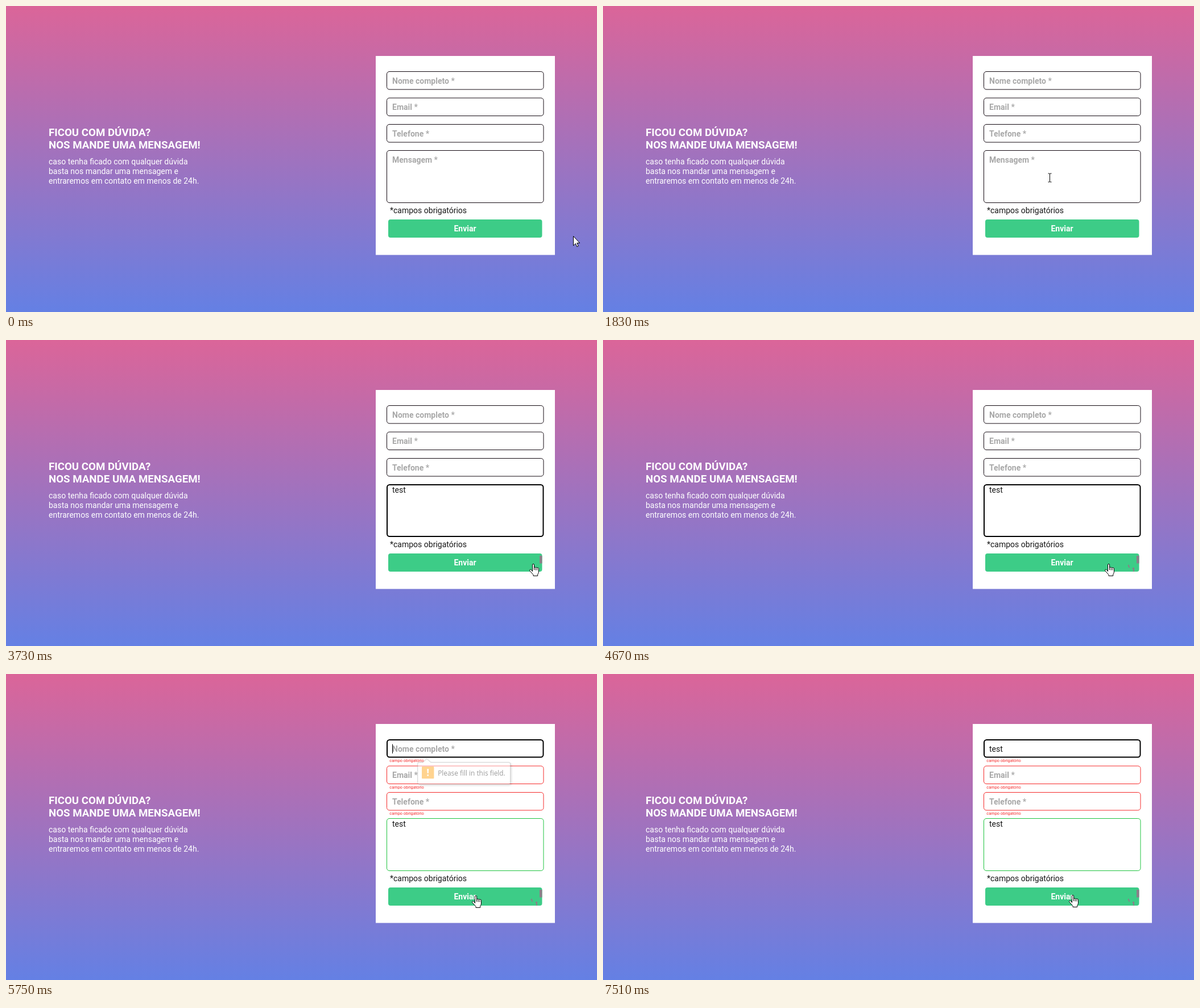
These frames come from a looping animation (1039 px wide and 539 px high, 8 s). An HTML page:

```html
<!DOCTYPE html>
<html lang="pt">
<head>
<meta charset="utf-8">
<title>Formulário de contato</title>
<style>
  html, body { margin: 0; width: 100%; height: 100%; overflow: hidden; }
  svg { display: block; width: 1039px; height: 539px; font: 14px Roboto, sans-serif; }
  text { white-space: pre; }
  .bold { font-weight: 700; }
  .hint { font-weight: 700; fill: #a8a8a8; }
  .typed, .note { fill: #181818; }
  .field { fill: #fff; stroke: #140a12; }
  .error { font-size: 7.4px; fill: #f52a2a; }
  .cursor { fill: #fff; stroke: #000; stroke-linejoin: round; }
</style>
</head>
<body>
<svg viewBox="0 0 1039 539">
  <defs>
    <linearGradient id="sky" x2="0" y2="1">
      <stop stop-color="#db6599"/>
      <stop offset="1" stop-color="#6480e4"/>
    </linearGradient>
    <filter id="shadow" x="-10%" y="-20%" width="120%" height="150%">
      <feDropShadow dx="2" dy="2" stdDeviation="1.5" flood-opacity=".3"/>
    </filter>
  </defs>
  <rect width="1039" height="539" fill="url(#sky)"/>
  <g fill="#fff">
    <g class="bold" font-size="18.7">
      <text x="75" y="229">FICOU COM DÚVIDA?</text>
      <text x="75" y="251.3">NOS MANDE UMA MENSAGEM!</text>
    </g>
    <text x="75" y="279">caso tenha ficado com qualquer dúvida</text>
    <text x="75" y="296">basta nos mandar uma mensagem e</text>
    <text x="75" y="312.5">entraremos em contato em menos de 24h.</text>
    <rect x="650" y="88" width="315" height="350.5"/>
  </g>
  <g id="form"></g>
  <text class="note" x="675" y="364.5">*campos obrigatórios</text>
  <rect x="672" y="376" width="270.5" height="32" rx="4" fill="#3dcc87"/>
  <text class="bold" x="807" y="397" text-anchor="middle" fill="#fff">Enviar</text>
  <g fill="#8a7f88">
    <path id="smudge1" d="M938 380h4.5v13.5h-4.5z"/>
    <path id="smudge2" d="M923 396h2v3h1v2h-2v-2h-1zM931 401h3v7h-2v-4h-1z"/>
  </g>
  <rect id="caret" width="1" height="16.5" fill="#000"/>
  <g id="bubble">
    <path d="M726.5 155.5H733l7-6.5 7 6.5H888.500q2.500 0 2.500 2.500V192.500q0 2.500-2.500 2.500H726q-2.500 0-2.500-2.500V158q0-2.500 2.500-2.500z"
      fill="#fff" stroke="#929292" filter="url(#shadow)"/>
    <rect x="731" y="163" width="22" height="22" rx="1" fill="#ff9f06"/>
    <path d="M740.500 167.500h3l-.5 8h-2zM740.700 177.500h2.600v2.600h-2.600z" fill="#fff"/>
    <text x="760" y="180" font-size="12.2" font-family="Open Sans, sans-serif" fill="#222">Please fill in this field.</text>
  </g>
  <path id="arrow" class="cursor" d="M.5 .5V17l3.800-3.600 2.500 5.600 2.500-1.100-2.500-5.400h4.900z"/>
  <path id="beam" d="M-3 -7.500h2.500l.5 .5 .5-.5H3M0 -7V7M-3 7.500h2.500l.5-.5 .5 .5H3" fill="none" stroke="#000"/>
  <path id="hand" class="cursor" d="M-1.500 13.500V2a1.500 1.500 0 0 1 3 0V7a1.400 1.400 0 0 1 2.700 .5 1.400 1.400 0 0 1 2.700 .5 1.300 1.300 0 0 1 2.600 1.200V14q0 3-1.800 4.800V21.500H0V19.500L-6 12.700q-1-1.600 .3-2.300t2.400 .8zM1.500 7v4M4.200 8v3.500M6.900 8.500v3"/>
</svg>
<script>
const LOOP = 8000, BLINK = 530, FOCUS_MESSAGE = 2100, SUBMIT = 5540;
const MESSAGE_KEYS = [2510, 2640, 2840, 2970];
const NAME_KEYS = [6590, 6720, 6850, 6980];

// Pointer stops: time, x, y
const POINTER = [
  [850, 997, 405], [1690, 789, 308], [1830, 785.5, 302.5],
  [2130, 785.5, 302.5], [2450, 945, 387], [3100, 945, 387],
  [3730, 927, 394], [3800, 924, 395.5], [4330, 924, 395.5],
  [5140, 833, 391], [5210, 826, 390], [6660, 826, 390], [6730, 826, 389]
];

const $ = id => document.getElementById(id);
const clamp = v => Math.max(0, Math.min(1, v));
const show = (el, on) => el.setAttribute('visibility', on ? 'visible' : 'hidden');

function add(tag, attrs, content = '') {
  const el = document.createElementNS('http://www.w3.org/2000/svg', tag);
  for (const key in attrs) el.setAttribute(key, attrs[key]);
  el.textContent = content;
  return $('form').appendChild(el);
}

function makeField(label, y, height, typedY) {
  const field = {
    y, height, typedY,
    box: add('rect', { class: 'field' }),
    hint: add('text', { class: 'hint', x: 679, y: y + 21.7 }, label),
    typed: add('text', { class: 'typed', x: 679, y: typedY }),
    error: add('text', { class: 'error', x: 674.3, y: y + 40 }, 'campo obrigatório')
  };
  setBorder(field, '#140a12', 1);
  return field;
}

function setBorder({ box, y, height }, color, width) {
  const attrs = {
    x: 669 + width / 2, y: y + width / 2, rx: 4.5,
    width: 276.5 - width, height: height - width, 'stroke-width': width
  };
  for (const key in attrs) box.setAttribute(key, attrs[key]);
  box.style.stroke = color;
}

const nameField = makeField('Nome completo *', 115, 32.5, 136.5);
const email = makeField('Email *', 161.5, 32.5, 183);
const phone = makeField('Telefone *', 208, 32.5, 229);
const message = makeField('Mensagem *', 254, 93, 268.5);

function setTyped(field, keys, t) {
  field.typed.textContent = 'test'.slice(0, keys.filter(k => k <= t).length);
  show(field.hint, !field.typed.textContent);
}

function pointerAt(t) {
  const next = POINTER.findIndex(p => p[0] > t);
  if (next < 1) return POINTER.at(next).slice(1);
  const [t0, x0, y0] = POINTER[next - 1], [t1, x1, y1] = POINTER[next];
  const u = (t - t0) / (t1 - t0), e = u * u * (3 - 2 * u);
  return [x0 + (x1 - x0) * e, y0 + (y1 - y0) * e];
}

function drawPointer(t) {
  const [x, y] = pointerAt(t);
  const inside = (l, top, r, b) => x > l && x < r && y > top && y < b;
  const kind = inside(672, 376, 942.5, 408) ? 'hand'
    : inside(669, 254, 945, 347) ? 'beam' : 'arrow';
  for (const id of ['arrow', 'beam', 'hand']) show($(id), id === kind);
  const snap = kind === 'beam' ? v => Math.floor(v) + 0.5 : Math.round;
  $(kind).setAttribute('transform', `translate(${snap(x)} ${snap(y)})`);
}

function drawCaret(t, submitted) {
  const field = submitted ? nameField : message;
  const events = submitted ? [SUBMIT, ...NAME_KEYS] : [FOCUS_MESSAGE, ...MESSAGE_KEYS];
  const last = Math.max(...events.filter(e => e <= t));
  show($('caret'), t >= FOCUS_MESSAGE && (t - last) % (2 * BLINK) < BLINK);
  const width = field.typed.textContent ? field.typed.getComputedTextLength() : 0;
  $('caret').setAttribute('x', Math.round(679 + width));
  $('caret').setAttribute('y', field.typedY - 13);
}

function drawBubble(t) {
  const grow = clamp((t - SUBMIT) / 470);
  const scale = 0.95 + 0.05 * grow;
  $('bubble').setAttribute('opacity', grow * (1 - clamp((t - NAME_KEYS[0]) / 140)));
  $('bubble').setAttribute('transform', `translate(731 160) scale(${scale}) translate(-731 -160)`);
}

function draw() {
  const t = performance.now() % LOOP;
  const submitted = t >= SUBMIT;
  const focused = submitted ? nameField : t >= FOCUS_MESSAGE ? message : null;

  setTyped(message, MESSAGE_KEYS, t);
  setTyped(nameField, NAME_KEYS, t);
  for (const field of [nameField, email, phone, message]) {
    const color = !submitted ? '#140a12' : field === message ? '#1fc43f' : '#f52a2a';
    if (field === focused) setBorder(field, '#000', 2);
    else setBorder(field, color, 1);
    show(field.error, submitted && field !== message);
  }
  show($('smudge1'), t >= 3300);
  show($('smudge2'), t >= 4500);
  drawCaret(t, submitted);
  drawBubble(t);
  drawPointer(t);
  requestAnimationFrame(draw);
}
draw();
</script>
</body>
</html>
```
